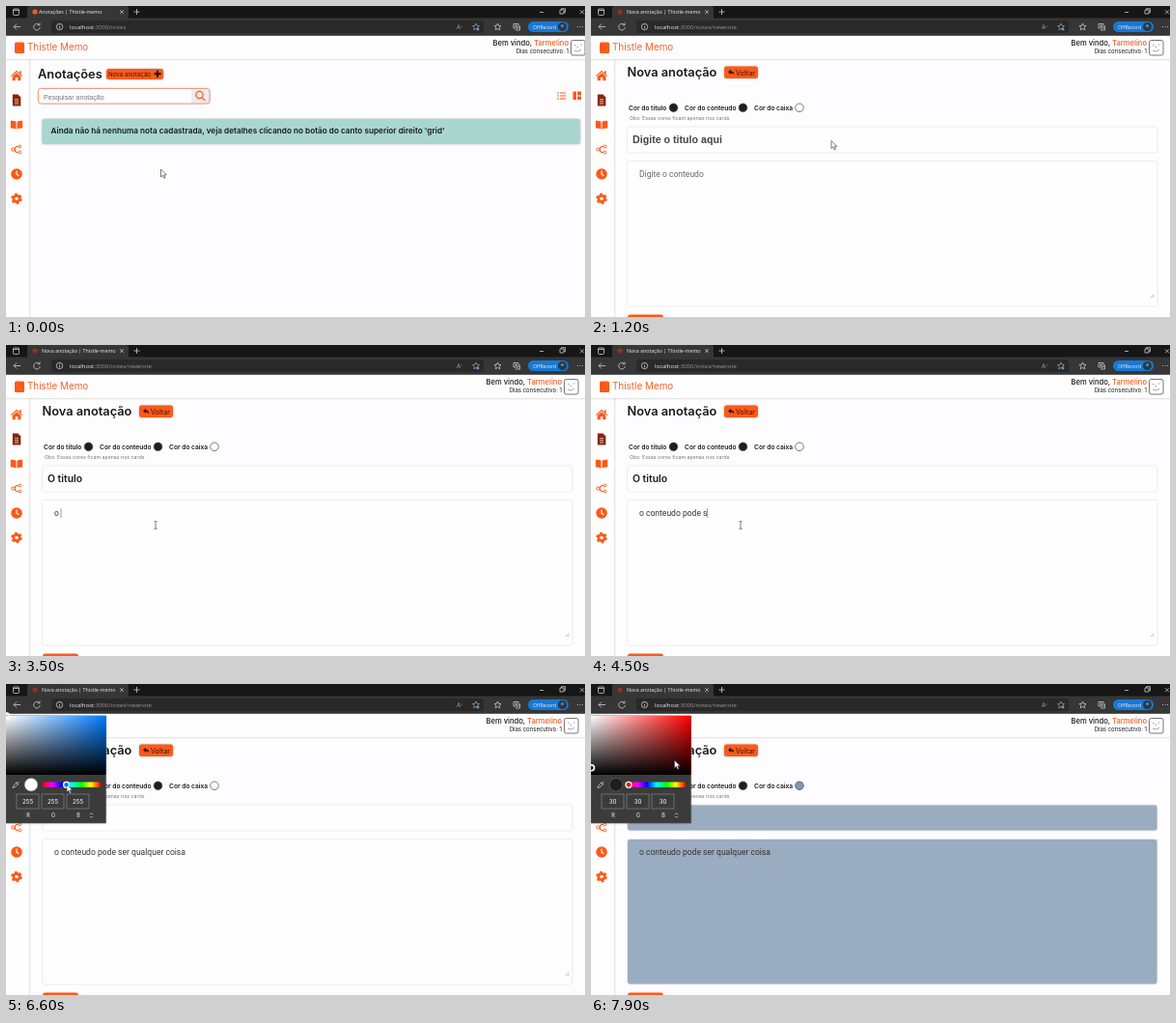
An HTML page for the animation above (8000 ms loop, 600x322 px).

```html
<!DOCTYPE html>
<html lang="pt">
<head>
<meta charset="utf-8">
<title>Notas</title>
<style>
  html, body { margin: 0; width: 100%; height: 100%; overflow: hidden; background: #fdfcfe; }
  svg { display: block; width: 100vw; height: 100vh; }
  text { font-family: Inter, sans-serif; fill: #1a1a1a; white-space: pre; }
  .chrome text { font-family: "Open Sans", sans-serif; fill: #eee; }
  .chrome .dim { fill: #999; }
  .line { fill: none; stroke: #ccc; stroke-width: .8; }
  .faint { stroke: #999; }
  .orange { fill: #fb5a1a; }
  .orangeLine { fill: none; stroke: #fb5a1a; stroke-width: 1.2; }
  .h1 { font-size: 12.8px; font-weight: 600; }
  .label { font-size: 6.65px; font-weight: 600; }
  .button { fill: #3a1508; }
  .title { font: 600 10.4px Inter, sans-serif; }
  .title.empty { font: bold 10.66px "Liberation Sans", sans-serif; fill: #444; }
  .content { font: 8.55px Roboto, sans-serif; fill: #333; }
  .content.empty { fill: #666; }
  .card { stroke: #ebe9ee; stroke-width: .9; }
  .panel { fill: #fefefe; filter: drop-shadow(0 0 .8px #0004); }
  .shade { filter: drop-shadow(0 .7px 1px #0004); }
  .field { fill: none; stroke: #858585; stroke-width: .7; }
  #picker text { fill: #fff; font-size: 6.2px; text-anchor: middle; }
  #picker .letter { font-size: 5.5px; }
</style>
</head>
<body>
<svg viewBox="0 0 600 322" preserveAspectRatio="none">
  <defs>
    <linearGradient id="toWhite"><stop stop-color="#fff"/><stop offset="1" stop-color="#fff" stop-opacity="0"/></linearGradient>
    <linearGradient id="toBlack" x2="0" y2="1"><stop stop-color="#000" stop-opacity="0"/><stop offset="1" stop-color="#000"/></linearGradient>
    <linearGradient id="hues">
      <stop stop-color="#f00"/><stop offset=".17" stop-color="#f0f"/><stop offset=".33" stop-color="#00f"/>
      <stop offset=".5" stop-color="#0ff"/><stop offset=".67" stop-color="#0f0"/><stop offset=".83" stop-color="#ff0"/><stop offset="1" stop-color="#f00"/>
    </linearGradient>
  </defs>
  <rect width="600" height="322" fill="#fdfcfe"/>

  <!-- Page header and sidebar -->
  <rect x="-5" y="50" width="29" height="280" class="panel"/>
  <rect x="-5" y="28" width="610" height="27" class="panel"/>
  <rect x="9" y="37.5" width="10" height="11.5" rx="1.5" class="orange"/>
  <text x="22" y="46.3" font-size="9.9" style="fill:#f2622b">Thistle Memo</text>
  <g id="welcome">
    <text x="576" y="41" font-size="7.6" font-weight="500" text-anchor="end">Bem vindo, <tspan class="orange">Tarmelino</tspan></text>
    <text x="576" y="49" font-size="6" text-anchor="end">Dias consecutivo: 1</text>
    <rect x="578.5" y="35.5" width="14.5" height="15.5" rx="2" fill="#fff" stroke="#555" stroke-width=".8"/>
    <path d="M582 40.5h1.5M588 40h1.5M585.5 41.5l-.5 2M582 46q4 2.5 7-.8" fill="none" stroke="#777" stroke-width=".7"/>
  </g>
  <g class="orange">
    <path d="m5.2 72.600 5.800-5 5.800 5" class="orangeLine"/>
    <path d="M6.600 73 11 69.300 15.400 73v4.300h-3.200v-3.200H9.800v3.200H6.600zM14 67.300h1.600v3H14z"/>
    <path d="M6.800 91.500h5.500l3 3V103.500H6.800z" fill="#872508"/>
    <path d="M9 96.700h4M9 98.800h4M9 101h4" stroke="#fff" stroke-width=".7"/>
    <path d="M4.800 118.800q3.500-.3 5.700 1v7.800q-2.500-1.300-5.700-1zM17.200 118.800q-3.500-.3-5.700 1v7.800q2.500-1.300 5.700-1z"/>
    <path d="M13 145.500h-1.500q-2 0-2.500 3 .5 3 2.500 3H13" class="orangeLine"/>
    <g fill="#fff" stroke="#fb5a1a"><circle cx="7.300" cy="148.500" r="1.600"/><circle cx="14.300" cy="145.500" r="1.400"/><circle cx="14.300" cy="151.500" r="1.400"/></g>
    <circle cx="11" cy="174" r="5.800"/>
    <path d="M11 170.500V174.300l2.300 1.500" stroke="#fff" fill="none" stroke-width="1.100"/>
    <circle cx="11" cy="199.500" r="4.500"/>
    <circle cx="11" cy="199.500" r="4.800" fill="none" stroke="#fb5a1a" stroke-width="2" stroke-dasharray="2.600 2.427"/>
    <circle cx="11" cy="199.500" r="1.800" fill="#fff"/>
  </g>

  <!-- Note list -->
  <g id="list">
    <text x="33" y="75" class="h1">Anotações</text>
    <rect x="104" y="65" width="59" height="11" rx="2.500" class="orange shade"/>
    <text x="106" y="72.800" font-size="6.200" class="button">Nova anotação</text>
    <path d="M157 66.800v7M153.500 70.300h7" stroke="#111" stroke-width="2"/>
    <rect x="33.500" y="85.500" width="177.500" height="15.500" rx="3" fill="#fff" class="shade"/>
    <path d="M192 86h17q2 0 2 2v11q0 2-2 2h-17z" fill="#ececef"/>
    <rect x="33.500" y="85.500" width="177.500" height="15.500" rx="3" fill="none" stroke="#f08a66" stroke-width=".8"/>
    <text x="39" y="96.800" style="font:7.100px 'Liberation Sans',sans-serif;fill:#757575">Pesquisar anotação</text>
    <circle cx="200.500" cy="92" r="3.600" class="orangeLine"/>
    <path d="m203.200 94.800 3.300 3.300" class="orangeLine"/>
    <path d="M571 90h2m1 0h6M571 93h2m1 0h6M571 96h2m1 0h6" class="orangeLine"/>
    <path id="gridIcon" d="M587.500 88.500h3.500v8.500h-3.500zM592 88.500h4v4h-4zM592 93.500h4v3.500h-4z"/>
    <rect id="alert" x="37.500" y="117" width="557.500" rx="2.500" fill="#a9d6d0" class="shade"/>
    <text x="46.500" y="132" font-size="8.200" font-weight="600">Ainda não há nenhuma nota cadastrada, veja detalhes clicando no botão do canto superior direito 'grid'</text>
    <text id="hint" x="46.500" y="144.300" font-size="6.900">Faça já sua primeira nota, clique no botão acima 'Nova anotação' ou click me</text>
  </g>

  <!-- Note editor -->
  <g id="editor">
    <text x="37.500" y="73" class="h1">Nova anotação</text>
    <rect x="138" y="62.500" width="35" height="12.500" rx="2.500" class="orange shade"/>
    <path d="m142 68.300 3-2.500v1.600q3.500 0 3.300 3.800-1-1.800-3.300-1.600v1.500z" class="button"/>
    <text x="150" y="71.500" font-size="7.200" class="button">Voltar</text>
    <text x="39" y="107.800" class="label">Cor do titulo</text>
    <text x="97" y="107.800" class="label">Cor do conteudo</text>
    <text x="169" y="107.800" class="label">Cor do caixa</text>
    <g fill="#1e1e1e" stroke="#444" stroke-width=".7">
      <circle cx="85.500" cy="105.300" r="4.300"/><circle cx="157.500" cy="105.300" r="4.300"/><circle id="boxSwatch" cx="216" cy="105.300" r="4.300"/>
    </g>
    <text x="40" y="117.600" font-size="5.250" style="fill:#777">Obs: Essas cores ficam apenas nos cards</text>
    <g id="cards">
      <rect x="37.500" y="125" width="549.500" height="27" rx="3" class="card"/>
      <rect x="37.500" y="160.500" width="549.500" height="150.500" rx="3" class="card"/>
    </g>
    <path d="m580 302 3.500-3.500m-1.500 3.500 1.500-1.500" stroke="#999" stroke-width=".6"/>
    <text id="title" x="43" y="142"></text>
    <text id="content" x="50" y="177"></text>
    <path id="caret" stroke="#777" stroke-width=".7"/>
    <rect x="38" y="319.500" width="37" height="10" rx="2.500" class="orange"/>
  </g>

  <!-- Browser frame -->
  <g class="chrome">
    <rect width="600" height="13" fill="#161616"/>
    <path d="M22 13V2q0-2 2-2h101q2 0 2 2v11z" fill="#363636"/>
    <rect y="12.500" width="600" height="18.300" fill="#363636"/>
    <rect x="47" y="15" width="448" height="13" rx="2.500" fill="#292929"/>
    <rect x="7.500" y="3" width="6" height="6.500" rx="1" class="line"/>
    <path d="M7.500 4.500h6" class="line"/>
    <circle id="favicon" cx="30" cy="6" r="2.600"/>
    <text id="tabName" y="8" font-size="5.300"></text>
    <path d="m118.200 4.300 3.600 3.600m0-3.600-3.600 3.600M132.500 6h6M135.500 3v6M553 6.500h4M595 4.300l4 4m0-4-4 4M574 4h4v4h-4zM575.500 4V2.700h4v4H578" class="line"/>
    <path d="M15 21.500H8m3-3-3 3 3 3M34.500 19.500a3.300 3.300 0 1 0 .8 2.500M35 17.500v2.300h-2.300" class="line"/>
    <circle cx="55.500" cy="21.500" r="3.200" class="line"/><path d="M55.500 21v2.300M55.500 19.500v.7" class="line"/>
    <text x="66" y="23.700" font-size="6">localhost<tspan class="dim" id="path"></tspan></text>
    <text x="467" y="24" font-size="6.500" class="dim">A<tspan font-size="4" dy="-2">»</tspan></text>
    <path d="m487 18 1 2.300 2.500.3-1.800 1.700.5 2.500-2.200-1.300-2.200 1.300.5-2.500-1.800-1.700 2.500-.3z" class="line faint"/>
    <path d="m509.500 18 1 2.300 2.500.3-1.800 1.700.5 2.500-2.200-1.300-2.200 1.300.5-2.500-1.800-1.700 2.500-.3z" class="line"/>
    <path d="M526 18.500h5v4.500h-5zM528 25h4.500v-4.500M528.500 19.500v2.500M527.300 20.800h2.500" class="line"/>
    <circle cx="489" cy="24" r="1.400" fill="#5a9ee0"/>
    <rect x="541" y="16" width="42" height="11" rx="5.500" fill="#1778d4"/>
    <text x="546" y="23.500" font-size="5.100">OffRecord</text>
    <circle cx="576.500" cy="21.500" r="4.500" fill="#25394d"/><circle cx="576.500" cy="20.500" r="1.600" fill="#6f8191"/>
    <path d="M592 21.500h1m1.500 0h1m1.500 0h1" class="line"/>
  </g>

  <!-- Colour picker -->
  <g id="picker">
    <rect y="33" width="103.500" height="111" fill="#3b3b3b" stroke="#555" stroke-width=".5" class="shade"/>
    <rect id="hueFill" y="33" width="103.500" height="61"/>
    <rect y="33" width="103.500" height="61" fill="url(#toWhite)"/>
    <rect y="33" width="103.500" height="61" fill="url(#toBlack)"/>
    <circle id="toneRing" r="2.900" fill="none" stroke="#fff" stroke-width="1.600"/>
    <path d="m7 107.500.5-2 3.500-3.500 1.500 1.500-3.500 3.500zM10.200 101.500l2.800 2.800M12 102.500l1.500-1.500" class="line"/>
    <circle id="preview" cx="26" cy="104.300" r="6.800" stroke="#777" stroke-width=".5"/>
    <rect x="38" y="101.500" width="60" height="5.500" rx="1" fill="url(#hues)"/>
    <circle id="hueRing" cy="104.300" r="3" stroke="#fff" stroke-width="1.300"/>
    <rect x="11" y="114" width="23" height="15" class="field"/>
    <rect x="37" y="114" width="23" height="15" class="field"/>
    <rect x="63" y="114" width="23" height="15" class="field"/>
    <text class="channel" x="22.500" y="123.800"></text><text class="channel" x="48.500" y="123.800"></text><text class="channel" x="74.500" y="123.800"></text>
    <text x="23" y="138" class="letter">R</text><text x="49" y="138" class="letter">G</text><text x="75" y="138" class="letter">B</text>
    <path d="m87 135.200 1.500-1.500 1.500 1.500m-3 1.600 1.500 1.500 1.500-1.500" class="line"/>
  </g>

  <g id="mouse" stroke-width=".7">
    <path id="arrow" d="M0 0v8l1.900-1.700 1.300 3 1.400-.6-1.300-2.900h2.500z" fill="#fff" stroke="#444"/>
    <path id="hand" d="M-.8 5.500V.7q.8-1 1.600 0v3l3 .7q.8.300.6 1.300l-.7 3.800H-.2l-2.600-3.300q0-1.300 1.300-.8z" fill="#fff" stroke="#222"/>
    <path id="beam" d="M-1.600-4Q0-4 0-3.200 0-4 1.600-4M0-3.200v6.600M-1.600 4Q0 4 0 3.200 0 4 1.600 4" fill="none" stroke="#444"/>
  </g>
</svg>
<script>
const $ = id => document.getElementById(id);
const set = (id, attrs) => { for (const k in attrs) $(id).setAttribute(k, attrs[k]); };
const show = (id, on) => { $(id).style.display = on ? '' : 'none'; };
const within = (t, a, b) => t >= a && t < b;
const channels = document.querySelectorAll('.channel');

// Each row: time, then values interpolated linearly up to the next row.
const mousePath = [
  [0, 160.5, 169], [100, 240, 160], [400, 590, 92], [500, 560, 105], [700, 276, 141], [1100, 276, 141],
  [1500, 168, 135], [2900, 168, 135], [3100, 155, 186.5], [5800, 155, 186.5], [6000, 215, 105],
  [6200, 170, 100], [6400, 39, 104], [6600, 63, 104], [6800, 12, 42], [7000, 27, 51],
  [7100, 27, 51], [7300, 135, 88], [7500, 85, 105], [7600, 85, 105], [7900, 86.5, 79]
];
const titleTyping = [[2200, 0], [2900, 8]];
const contentTyping = [[3300, 0], [3400, 1], [3500, 2], [4200, 10], [4800, 25], [4900, 25], [5500, 35]];
const boxColour = [[6400, 360, 0, 1], [6600, 211, 0, 1], [6800, 211, .12, .85], [7000, 211, .261, .69]];
const inkColour = [360, 0, 30 / 255];

function track(rows, t) {
  let i = rows.findIndex(row => row[0] > t);
  if (i < 0) i = rows.length;
  const a = rows[Math.max(i - 1, 0)], b = rows[Math.min(i, rows.length - 1)];
  const k = b[0] > a[0] ? (t - a[0]) / (b[0] - a[0]) : 0;
  return a.slice(1).map((v, j) => v + (b[j + 1] - v) * k);
}

function hsvToRgb([h, s, v]) {
  return [5, 3, 1].map(n => {
    const k = (n + h / 60) % 6;
    return Math.round(255 * v * (1 - s * Math.max(0, Math.min(k, 4 - k, 1))));
  });
}

function drawList(t) {
  const grid = t >= 400;
  set('alert', { height: grid ? 38 : 26 });
  set('gridIcon', { fill: grid ? '#872508' : '#fb5a1a' });
  show('hint', grid);
}

function drawInput(id, typed, placeholder) {
  $(id).textContent = typed || placeholder;
  set(id, { class: typed ? id : id + ' empty' });
}

function drawEditor(t) {
  const title = 'O titulo'.slice(0, Math.floor(track(titleTyping, t)[0]));
  const content = 'o conteudo pode ser qualquer coisa '.slice(0, Math.floor(track(contentTyping, t)[0]));
  drawInput('title', title, 'Digite o titulo aqui');
  drawInput('content', content, 'Digite o conteudo');

  const inContent = t >= 3100, typed = inContent ? content : title;
  const width = typed ? $(inContent ? 'content' : 'title').getComputedTextLength() : 0;
  set('caret', { d: inContent ? `M${50 + width} 169v10` : `M${43.7 + width} 132.500v12` });
  show('caret', within(t, 1600, 2100) || within(t, 2300, 3000) || within(t, 3200, 5700));

  const rgb = hsvToRgb(track(boxColour, t));
  set('boxSwatch', { fill: `rgb(${rgb})` });
  set('cards', { fill: `rgb(${rgb.map(c => c * .8 + 50)})` });
}

function drawPicker(t) {
  const hsv = t < 7300 ? track(boxColour, t) : inkColour;
  const [h, s, v] = hsv, rgb = hsvToRgb(hsv), hue = `hsl(${h} 100% 50%)`;
  show('picker', within(t, 6100, 7300) || t >= 7600);
  set('hueFill', { fill: hue });
  set('toneRing', { cx: .5 + s * 104, cy: 33 + (1 - v) * 61 });
  set('hueRing', { cx: 39 + (360 - h) / 360 * 57, fill: hue });
  set('preview', { fill: `rgb(${rgb})` });
  channels.forEach((el, i) => { el.textContent = rgb[i]; });
}

function drawMouse(t) {
  const kind = within(t, 400, 500) || within(t, 700, 1200) ? 'hand' : within(t, 1500, 5900) ? 'beam' : 'arrow';
  for (const id of ['arrow', 'hand', 'beam']) show(id, id === kind);
  set('mouse', { transform: `translate(${track(mousePath, t)})` });
}

function draw(t) {
  const editing = t >= 1100;
  show('list', !editing);
  show('editor', editing);
  set('welcome', { transform: `translate(${editing ? 0 : 7})` });
  set('tabName', { x: editing ? 37 : 34 });
  set('favicon', { fill: editing ? '#8f3320' : '#fb5a1a' });
  $('tabName').textContent = (editing ? 'Nova anotação' : 'Anotações') + ' | Thistle-memo';
  $('path').textContent = ':3000/notes' + (editing ? '/newnote' : '');
  drawList(t);
  drawEditor(t);
  drawPicker(t);
  drawMouse(t);
}

const start = performance.now();
function tick() {
  const t = (performance.now() - start) % 8000;
  draw(Math.floor(t / 100) * 100);
  requestAnimationFrame(tick);
}
tick();
</script>
</body>
</html>
```
